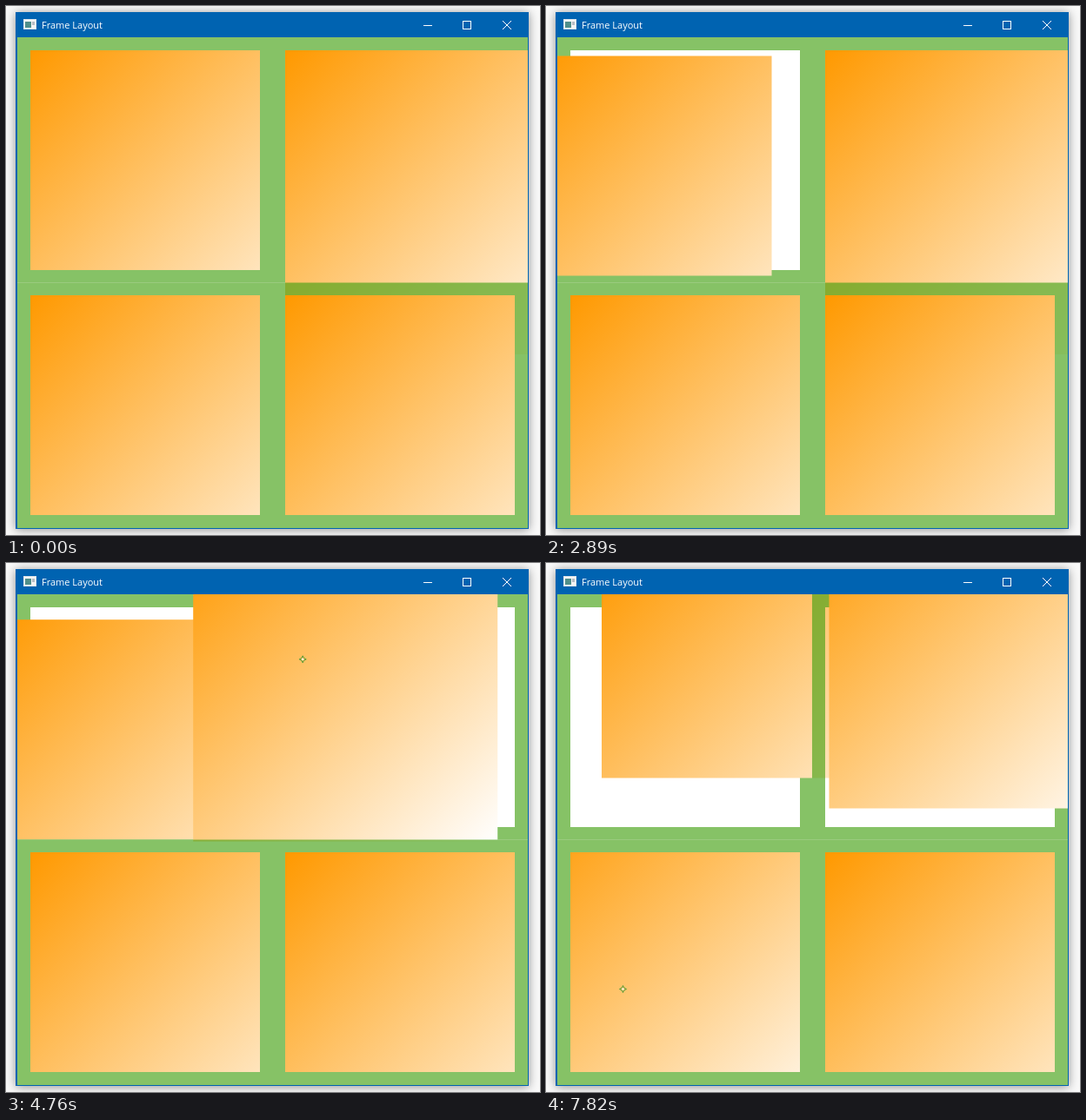
An HTML page with a canvas for the animation above (7990 ms loop, 614 by 609 pixels).

```html
<!DOCTYPE html>
<html lang="en">
<head>
<meta charset="utf-8">
<title>Frame Layout</title>
<style>
  html, body { margin: 0; width: 100%; height: 100%; overflow: hidden; background: #f9f9f9; }
  .window { position: absolute; left: 11px; top: 7px; width: 590px; height: 595px;
    background: #0063b1; box-shadow: 0 1px 11px rgba(0, 0, 0, .42); }
  .title { position: absolute; left: 30px; top: 6px; color: #fff; white-space: nowrap;
    font: 11px/18px "Open Sans", "Noto Sans", sans-serif; }
  .window svg { position: absolute; left: 1px; top: 1px; }
  canvas { position: absolute; left: 2px; top: 29px; }
</style>
</head>
<body>
<div class="window">
  <svg width="589" height="28" fill="none" stroke="#fff">
    <rect x="8.5" y="7.5" width="14" height="11" fill="#f4f4f4" stroke="#dfe5ea"/>
    <rect x="10" y="10" width="7" height="7" fill="#4f8f8a" stroke="none"/>
    <rect x="18" y="10" width="3" height="4" fill="#b8bcc4" stroke="none"/>
    <path d="M468 14.5h10"/>
    <rect x="513.5" y="9.5" width="9" height="9"/>
    <path d="M559 9l10 10M569 9l-10 10"/>
  </svg>
  <span class="title">Frame Layout</span>
  <canvas width="587" height="565"></canvas>
</div>
<script>
const LOOP = 7990, STEP = 170;
const W = 264, H = 253, BIG = 350;
const ctx = document.querySelector('canvas').getContext('2d');

// Key points: time, x, y
const first = [
  [680, 28, 51], [1360, -28, 69], [1700, 63, 115],
  [2890, -4.5, 57.5], [5440, -13.5, 68], [5610, 36, 23], [6120, 64, -5.5]
];
const second = [
  [2890, 321, 51], [3400, 270, 89], [3740, 278, -5], [4250, 132.5, -1], [5440, 325.5, -67.5]
];
const pan = [[6800, 0, 0], [7820, -40, -40]];

// The pointer rides on a path: grip is its offset, slip how far that offset shifts
const drags = [
  { path: first, from: 850, to: 2720, grip: [109, 56.5], slip: [0, 0] },
  { path: second, from: 3060, to: 4250, grip: [83, 197], slip: [53.5, -70] },
  { path: second, from: 4420, to: 5440, grip: [136, 127], slip: [-30, 40] },
  { path: first, from: 5610, to: 6630, grip: [170, 89.5], slip: [0, 0] },
  { path: pan, from: 6800, to: 7820, grip: [128.5, 530.5], slip: [0, 0] }
];

const mix = (a, b, k) => a + (b - a) * k;

function at(path, t) {
  const i = path.findIndex(p => t <= p[0]);
  if (i < 1) return path.at(i).slice(1);
  const [t0, x0, y0] = path[i - 1], [t1, x1, y1] = path[i];
  const k = (t - t0) / (t1 - t0);
  return [mix(x0, x1, k), mix(y0, y1, k)];
}

// Translucent frame with an open middle
function border(x, y, w, h, ix, iy) {
  ctx.fillStyle = 'rgba(69,161,21,.65)';
  ctx.beginPath();
  ctx.rect(x, y, w, h);
  ctx.rect(ix, iy, W, H);
  ctx.fill('evenodd');
}

function panel(x, y, w, h, dx = 0, dy = 0) {
  const g = ctx.createLinearGradient(x + dx, y + dy, x + dx + BIG, y + dy + BIG);
  g.addColorStop(0, '#ff9900');
  g.addColorStop(1, '#ffffff');
  ctx.fillStyle = g;
  ctx.fillRect(x, y, w, h);
}

function star(x, y) {
  ctx.beginPath();
  for (let i = 0; i < 8; i++) {
    const r = i % 2 ? 1.8 : 4, a = i * Math.PI / 4;
    ctx.lineTo(x + r * Math.cos(a), y + r * Math.sin(a));
  }
  ctx.closePath();
  ctx.strokeStyle = '#4c9a35';
  ctx.stroke();
  ctx.fillStyle = '#ffffff';
  ctx.fillRect(x - 1, y - 1, 2, 2);
}

function pointer(t) {
  const d = drags.find(d => t >= d.from && t <= d.to);
  if (!d) return;
  const k = (t - d.from) / (d.to - d.from);
  const [x, y] = at(d.path, t).map((v, i) => v + d.grip[i] + d.slip[i] * k);
  star(x, y);
}

function draw(t) {
  ctx.setTransform(1, 0, 0, 1, 0, 0);
  ctx.fillStyle = '#fff';
  ctx.fillRect(0, 0, 587, 565);
  ctx.translate(-13, -36);

  border(13, 36, 293, 282.5, 28, 51);
  panel(...at(first, t), W, H);
  border(306, 36, 294, 282.5, 321, 51);
  panel(...at(second, t), BIG, BIG);
  border(13, 318.5, 293, 282.5, 28, 333);
  panel(28, 333, W, H, ...at(pan, t));
  border(306, 318.5, 294, 282.5, 321, 333);
  panel(321, 333, W, H);
  pointer(t);
}

function tick() {
  const t = performance.now() % LOOP;
  draw(Math.floor(t / STEP) * STEP);
  requestAnimationFrame(tick);
}
tick();
</script>
</body>
</html>
```
